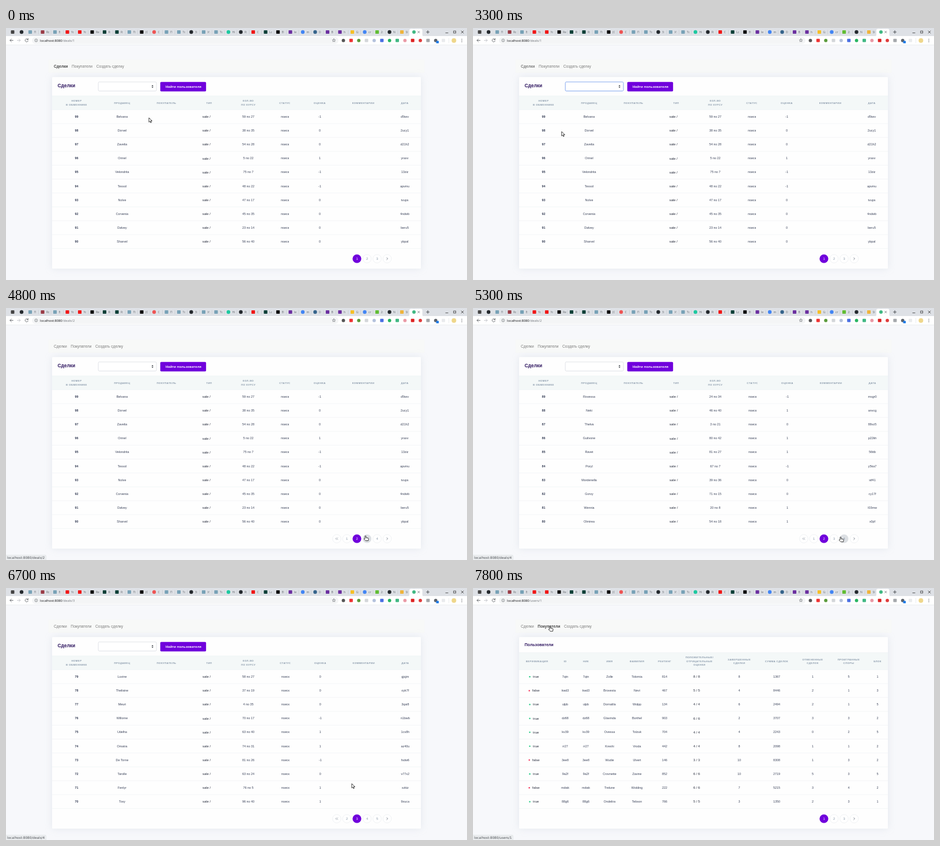
These frames come from a looping animation (800 px wide and 438 px high, 8 s). An HTML page:

```html
<!DOCTYPE html>
<html lang="ru">
<head>
<meta charset="utf-8">
<title>Сделки</title>
<style>
  html, body { margin: 0; height: 100%; overflow: hidden; background: #f7f8fb; }
  svg { display: block; width: 100vw; height: 100vh; }
  text { font-family: "Liberation Sans", Arial, sans-serif; white-space: pre; }
  .ui { font-family: "Noto Sans", "Open Sans", sans-serif; }
  .status { font-family: "DejaVu Sans", sans-serif; }
  .head { font-weight: bold; letter-spacing: .4167px; fill: #8898aa; }
  .bold { font-weight: bold; }
  .card { fill: #fefefe; filter: drop-shadow(0 0 6.6px rgba(136, 152, 170, .17)); }
  .line { fill: none; stroke-linecap: round; stroke-linejoin: round; }
</style>
</head>
<body>
<svg id="stage" viewBox="0 0 800 438" preserveAspectRatio="none"></svg>
<script>
const LOOP = 8000, STEP = 100;
const INK = '#384058', DARK_INK = '#2b3040', PURPLE = '#7000dc';

// Drawing helpers; text is placed by its vertical middle.
const rect = (x, y, w, h, fill, more = '') =>
  `<rect x="${x}" y="${y}" width="${w}" height="${h}" fill="${fill}" ${more}/>`;
const dot = (x, y, r, fill, more = '') =>
  `<circle cx="${x}" cy="${y}" r="${r}" fill="${fill}" ${more}/>`;
const line = (d, stroke, width = .8) =>
  `<path class="line" d="${d}" stroke="${stroke}" stroke-width="${width}"/>`;
const text = (x, y, s, size = 5.42, more = '', anchor = 'middle') =>
  `<text x="${x}" y="${y + size * .36}" font-size="${size}" text-anchor="${anchor}" ${more}>${s}</text>`;
const group = (id, content, more = '') => `<g id="${id}" ${more}>${content}</g>`;

// Browser frame
const STEEL = '#78a2b7', DARK = '#24292e', TEAL = '#0e4038', RED = '#f01818', BLUE = '#4285f4', VIOLET = '#6b2fa0';
const ROUND = [DARK, BLUE, '#e55', '#1ec9a0', '#36648b'];
const tabs = [
  ['П', STEEL], ['Rc', '#9a3c46'], ['E:', STEEL], ['Yc', RED], ['Yc', RED], ['Re', '#111'],
  ['R:', TEAL], ['R:', TEAL], ['П:', STEEL], ['(С', '#111'], ['С', '#e55'], ['П', STEEL],
  ['Tc', STEEL], ['З:', DARK], ['У:', STEEL], ['Tc', STEEL], ['Hi', '#1ec9a0'],
  ['R:', DARK], ['C', RED], ['Lc', TEAL], ['El', '#111'], ['le', VIOLET], ['m', BLUE],
  ['D', '#36648b'], ['B', VIOLET], ['h', VIOLET], ['G:', '#f6c026'], ['cr', BLUE],
  ['2:', '#62bd35'], ['N', DARK], ['Sl', '#efb43c']
];
const extensions = ['#555', '#e33', '#5b9b3c', '#d3d6d9', '#b4c2dc', '#4a6fe3', '#27b562', '#41b883',
  '#ea9aa6', '#d22', '#e03a3a', '#a5a8ac', '#5d636b', '#e9ebed'];

function browserFrame() {
  let s = rect(0, 0, 800, 14.5, '#dee1e6') + rect(0, 14, 800, 15.3, '#fff')
    + line('M0 29.4H800', '#d9dce0', .5)
    + '<path fill="#fff" d="M698 14.5q2-.5 2-3V4q0-2.5 2.5-2.5H720q2.5 0 2.5 2.5V11.5q0 2.5 2 3z"/>'
    + rect(8.5, 4, 6, 6, '#444', 'rx="1"') + dot(27, 7, 3.2, DARK);
  tabs.forEach(([label, color], i) => {
    const x = 42 + 21.5 * i;
    s += (ROUND.includes(color) ? dot(x, 7, 3.2, color) : rect(x - 3.1, 4, 6.2, 6, color, 'rx=".8"'))
      + text(x + 6.5, 7.2, label, 5, 'class="ui" fill="#6a6f75"', 'start');
    if (i < 30) s += line(`M${x + 14.5} 4V10.5`, '#b4b8bd', .4);
  });
  s += dot(708, 7, 3, '#41b883')
    + line('M714.5 5.3l3.4 3.4m0-3.4l-3.4 3.4', '#5f6368', .7)
    + line('M729.5 7h5M732 4.5v5', '#3c4043', .9)
    + line('M763 8.5h4M790 5l4 4m0-4l-4 4', '#333', .8)
    + rect(776.8, 5.2, 3.6, 3.6, 'none', 'stroke="#333" stroke-width=".8"')
    + line('M12.3 21.5H7m2.4-2.5L6.9 21.5l2.5 2.5', '#505458')
    + line('M19.5 21.5h5.3m-2.4-2.5l2.5 2.5-2.5 2.5', '#b9bcc0')
    + line('M38 19.8a2.7 2.7 0 1 0 .4 2.6M38.4 18.3v2h-2', '#505458')
    + rect(45, 15.8, 532, 12, '#f4f5f6', 'rx="6"')
    + dot(52.3, 21.5, 2.5, 'none', 'stroke="#5f6368" stroke-width=".6"')
    + line('M52.3 21.3v1.5M52.3 20v.1', '#5f6368', .6)
    + line('M569 18.7l.8 1.9 2 .1-1.6 1.3.6 2-1.8-1.1-1.8 1.1.6-2-1.6-1.3 2-.1z', '#5f6368', .6)
    + '<text class="ui" x="59" y="23.7" font-size="5.7" fill="#202124">localhost:8080<tspan id="url" fill="#777b80"></tspan></text>';
  extensions.forEach((color, i) => {
    const x = 585.5 + 13.35 * i;
    s += i % 2 ? rect(x - 3, 18.8, 6, 5.8, color, 'rx="1"') : dot(x, 21.7, 2.9, color);
  });
  return s + rect(746.5, 22.5, 4.5, 4, '#1877e6') + line('M768.5 18v8', '#d0d3d6', .4)
    + dot(777.3, 21.7, 4, '#efd78b')
    + [19.4, 21.7, 24].map(y => dot(791, y, .65, '#5f6368')).join('');
}

// Tables
const rowY = i => 154 + 24.13 * i;
const rowLines = Array.from({ length: 10 }, (_, i) => line(`M80 ${rowY(i) + 12.1}H720`, '#e6eaee', .5)).join('');

function header(top, cols) {
  return rect(80, top, 640, 142 - top, '#f4f8f8') + line(`M80 ${top}H720M80 142H720`, '#e6eaee', .4)
    + cols.map(([x, label]) => {
      const lines = label.split('|'), mid = (top + 142) / 2;
      return lines.map((s, i) =>
        text(x, mid + (i - (lines.length - 1) / 2) * 6.3, s, 4.33, 'class="head"')).join('');
    }).join('');
}

const bigCell = (x, y, s) => text(x, y, s, 6, `fill="${DARK_INK}"`);

function dealsTable(first, shift, data) {
  const x = [122.5, 201.5, 278.5, 352.5, 420.5, 484 + shift, 544.5 + shift, 620 + shift, 692 + shift];
  const labels = ['НОМЕР|В ОБМЕННИКЕ', 'ПРОДАВЕЦ', 'ПОКУПАТЕЛЬ', 'ТИП', 'КОЛ-ВО|ПО КУРСУ', 'СТАТУС',
    'ОЦЕНКА', 'КОММЕНТАРИЙ', 'ДАТА'];
  return header(118, labels.map((s, i) => [x[i], s])) + rowLines
    + data.split(';').map((row, i) => {
      const [name, amount, rate, mark, date] = row.trim().split(','), y = rowY(i);
      return text(x[0], y, first - i, 5.42, 'class="bold"') + text(x[1], y, name)
        + bigCell(347.8 + shift * .4, y, 'sale /') + text(x[4], y, `${amount} по ${rate}`)
        + text(x[5], y, 'поиск') + text(x[6], y, mark) + text(x[8], y, date);
    }).join('');
}

function usersTable(data) {
  const cols = [[111, 'ВЕРИФИКАЦИЯ'], [160, 'ID'], [196, 'НИК'], [237, 'ИМЯ'], [284.5, 'ФАМИЛИЯ'],
    [332.5, 'РЕЙТИНГ'], [393, 'ПОЛОЖИТЕЛЬНЫЕ/|ОТРИЦАТЕЛЬНЫЕ|ОЦЕНКИ'], [462, 'ЗАВЕРШЕННЫЕ|СДЕЛКИ'],
    [527, 'СУММА СДЕЛОК'], [589.5, 'ОТМЕНЕННЫЕ|СДЕЛОК'], [652, 'ПРОИГРАННЫЕ|СПОРЫ'], [702, 'БЛОК']];
  return header(112.3, cols) + rowLines
    + data.split(';').map((row, i) => {
      const [flag, nick, ...rest] = row.trim().split(','), y = rowY(i), ok = flag === '1';
      return dot(ok ? 98.5 : 97.7, y + .3, 1.25, ok ? '#2dce89' : '#f5365c')
        + bigCell(109.2, y, ok)
        + [nick, nick, ...rest].map((s, k) =>
          k === 5 ? bigCell(388, y, `${s} / ${s}`) : text(cols[k + 1][0], y, s)).join('');
    }).join('');
}

const deals = [
  dealsTable(99, 0, `Belvana,59,27,-1,d5iwv;Dorvel,38,35,0,2ucy1;Zavelia,54,28,0,d21h2;Orinel,5,22,1,yraxv;
    Velondrita,75,7,-1,13ziz;Tessol,48,22,-1,apvmu;Nolve,47,17,0,tvups;Corvenia,45,35,0,4ndwb;
    Dalvey,23,14,0,beru5;Sharvel,56,40,0,ybpal`),
  dealsTable(89, 1, `Rovessa,24,34,-1,msgr0;Neki,46,40,1,anvcg;Thelva,3,21,0,88vz5;Guilvone,80,42,1,p22kh;
    Ravet,81,27,1,56ttb;Poryl,67,7,-1,y5ka7;Mordenella,39,36,0,stf41;Gorvy,71,15,0,cy17f;
    Wennia,20,8,1,l03mw;Olmirea,54,18,1,x0pf`),
  dealsTable(79, .8, `Luvine,58,27,0,gjqjm;Thelisine,37,19,0,oyk7f;Meuri,4,35,0,3qai8;Willorne,70,17,-1,n1bwb;
    Udelha,63,40,1,1cs8h;Omatra,74,31,1,az40u;De Torne,81,26,-1,fsdw6;Tarolle,63,24,0,v77x2;
    Fenlyr,76,5,1,xzkiz;Tovy,96,40,1,9xuca`)
];
const users = usersTable(`1,7qtn,Zolle,Tolomia,814,8,8,1367,1,5,1;0,kwd3,Brovesta,Nevi,467,5,4,8446,2,1,3;
  1,ulpb,Dornalila,Wolpp,134,4,6,2494,2,1,5;1,dz68,Glavinda,Borthel,903,6,2,3707,3,3,2;
  1,kv39,Ovessa,Tolzuk,704,4,4,2243,0,2,5;1,rr27,Kreshi,Vroda,442,4,8,2098,1,1,2;
  0,3ee8,Wudie,Ulvert,146,3,10,8308,1,3,2;1,9a2f,Crovnette,Zavine,852,6,10,2719,5,3,5;
  0,mdwk,Trelune,Wolding,222,6,7,5215,3,4,2;1,88g6,Ondelira,Tebson,766,5,3,1350,2,3,1`);

// Pagination: six slots, the current page always sits in the third one.
function pager(page) {
  let s = '';
  for (let i = page === 1 ? 2 : 0; i < 6; i++) {
    const x = 574 + 17.5 * i, current = i === 2;
    s += current ? dot(x, 401, 7.6, PURPLE)
      : dot(x, 401, 7.3, '#fff', `class="slot${i}" stroke="#dee2e6" stroke-width=".45"`);
    if (i === 0) s += line(`M${x - .4} 399.2l-1.8 1.8 1.8 1.8m2.4-3.6l-1.8 1.8 1.8 1.8`, '#7c8796', .6);
    else if (i === 5) s += line(`M${x - .8} 399.2l1.8 1.8-1.8 1.8`, '#5c6675', .8);
    else s += text(x, 401, page + i - 2, 5.83, `fill="${current ? '#fff' : '#8898aa'}"`);
  }
  return s;
}

const TITLE = 'class="bold" fill="#2f1760"';
const dealsTop = text(89.5, 100, 'Сделки', 8.33, TITLE, 'start')
  + rect(160.2, 93.8, 100.8, 15.7, '#fff', 'id="select" rx="1.7"')
  + '<path fill="#343a40" d="M252.6 101l1.6-2 1.6 2zM252.6 102.2l1.6 2 1.6-2z"/>'
  + rect(267.7, 93.7, 79.5, 16.6, PURPLE, 'rx="1.7"')
  + text(308, 102.1, 'Найти пользователя', 5.83, 'class="bold" fill="#fff" letter-spacing=".146"');
const usersTop = text(89.5, 98.7, 'Пользователи', 7.08, TITLE, 'start');

const outlined = d => `<path fill="#fff" stroke="#111" stroke-width=".8" stroke-linejoin="round" d="${d}"/>`;
const cursors = {
  arrow: outlined('M0 0V7.6L1.8 6 3 8.7 4.3 8.1 3.1 5.5H5.5Z'),
  hand: outlined('M-1 5V.8a.9.9 0 0 1 1.8 0V3.2l3.5.7q.9.2.9 1.2l-.6 3.4H.2l-3-3.1q.6-1.2 1.8-.4z'),
  beam: line('M-1.6-4Q0-4 0-3.2Q0-4 1.6-4M0-3.2V3.2M-1.6 4Q0 4 0 3.2Q0 4 1.6 4', '#222', .9)
};

document.getElementById('stage').innerHTML =
  rect(0, 0, 800, 438, '#f7f8fb') + rect(73.7, 54.5, 652.6, 23.3, '#f8f9f8') + browserFrame()
  + '<text id="nav" x="83" y="68.6" font-size="6.67"><tspan>Сделки</tspan><tspan dx="6.67">Покупатели</tspan><tspan dx="6.67">Создать сделку</tspan></text>'
  + rect(80, 85.3, 640, 333, '#fefefe', 'class="card" rx="1.5"')
  + group('dealsTop', dealsTop) + group('usersTop', usersTop)
  + [...deals, users].map((s, i) => group('table' + i, s, `fill="${INK}"`)).join('')
  + [1, 2, 3].map(p => group('pager' + p, pager(p))).join('')
  + group('status', rect(-2, 429.5, 71.5, 11, '#eceef0', 'rx="1.5" stroke="#d5d8dc" stroke-width=".4"')
    + '<text id="link" class="status" x="2" y="435.8" font-size="5.75" fill="#4b4f54"></text>')
  + group('cursor', Object.entries(cursors).map(([name, s]) => group(name, s)).join(''));

// Timeline
const path = [
  [0, 248, 156, 'arrow'], [600, 248, 156, 'arrow'], [700, 244, 146, 'arrow'], [800, 233, 120, 'arrow'],
  [900, 226, 109, 'beam'], [1000, 226, 109, 'beam'], [1100, 226, 108.5, 'beam'], [1600, 226, 108.5, 'beam'],
  [1700, 234, 107, 'beam'], [1900, 254, 106.8, 'beam'], [3000, 254, 106.8, 'beam'],
  [3100, 236, 125, 'arrow'], [3300, 153.8, 180, 'arrow'], [3400, 158, 184, 'arrow'], [3500, 200, 207, 'arrow'],
  [3900, 563, 364, 'arrow'], [4000, 600, 385, 'arrow'], [4100, 621, 397, 'hand'], [4500, 624, 396, 'hand'],
  [5100, 624, 396, 'hand'], [5300, 638, 398, 'hand'], [5500, 640, 399, 'hand'], [5700, 639.5, 399, 'hand'],
  [5800, 639.5, 399, 'hand'], [5900, 637, 400, 'hand'], [6000, 634.8, 400.5, 'arrow'],
  [6200, 634.8, 400.5, 'arrow'], [6300, 629, 399, 'hand'], [6600, 627, 398, 'hand'],
  [6700, 600, 340, 'arrow'], [6900, 270, 140, 'arrow'], [7000, 165, 78, 'arrow'], [7100, 144, 60, 'hand'],
  [7300, 138, 71, 'hand'], [7500, 133.8, 66.7, 'hand'], [LOOP, 133.8, 66.7, 'hand']
];
// Each entry holds from its time until the next one.
const urls = [[0, '/deals/1'], [4700, '/deals/2'], [6500, '/deals/3'], [7700, '/users/1']];
const links = [[0, ''], [4200, '/deals/2'], [4900, '/deals/3'], [5300, '/deals/4'], [6400, '/deals/3'],
  [6600, '/deals/4'], [7000, '/users/1']];
const tables = [[0, 0], [4900, 1], [6700, 2], [7700, 3]];
const pagers = [[0, 1], [4700, 2], [6500, 3], [7700, 1]];
const hovers = [[0, -1], [4100, 3], [5300, 4], [5900, -1], [6300, 3], [6700, -1]];

const $ = id => document.getElementById(id);
const at = (track, t) => track.findLast(([start]) => start <= t)[1];
const ramp = (t, from, to) => Math.min(1, Math.max(0, (t - from) / (to - from)));
const show = (id, on) => { $(id).style.display = on ? '' : 'none'; };
const navItems = $('nav').children;

function render(t) {
  const table = at(tables, t), page = at(pagers, t), hover = at(hovers, t), url = at(urls, t), link = at(links, t);
  for (let i = 0; i < 4; i++) show('table' + i, i === table);
  for (let p = 1; p <= 3; p++) show('pager' + p, p === page);
  show('dealsTop', table < 3);
  show('usersTop', table === 3);
  for (const i of [3, 4]) $('pager' + page).querySelector('.slot' + i).setAttribute('fill', hover === i ? '#dcdfe3' : '#fff');

  $('url').textContent = url;
  show('status', link);
  $('link').textContent = 'localhost:8080' + link;

  const alphas = [.72 - .22 * ramp(t, 2200, 2700), .5 + .22 * ramp(t, 6900, 7100), .5];
  const active = { '/deals/1': 0, '/users/1': 1 }[url];
  alphas.forEach((alpha, i) => {
    navItems[i].setAttribute('fill', `rgba(0,0,0,${alpha})`);
    navItems[i].setAttribute('font-weight', i === active ? 'bold' : 'normal');
  });

  const focus = ramp(t, 2200, 2400) * (1 - ramp(t, 3300, 3500));
  const mix = (a, b) => Math.round(a + (b - a) * focus);
  $('select').setAttribute('stroke', `rgb(${mix(205, 120)},${mix(209, 160)},${mix(216, 238)})`);
  $('select').setAttribute('stroke-width', .6 + .3 * focus);

  const next = path.findIndex(([start]) => start > t);
  const [t0, x0, y0, shape] = path[next - 1], [t1, x1, y1] = path[next];
  const k = ramp(t, t0, t1);
  $('cursor').setAttribute('transform', `translate(${x0 + (x1 - x0) * k} ${y0 + (y1 - y0) * k})`);
  for (const name in cursors) show(name, name === shape);
}

const begin = performance.now();
function frame(now) {
  const t = Math.max(0, now - begin) % LOOP;
  render(Math.floor(t / STEP) * STEP);
  requestAnimationFrame(frame);
}
frame(begin);
</script>
</body>
</html>
```
